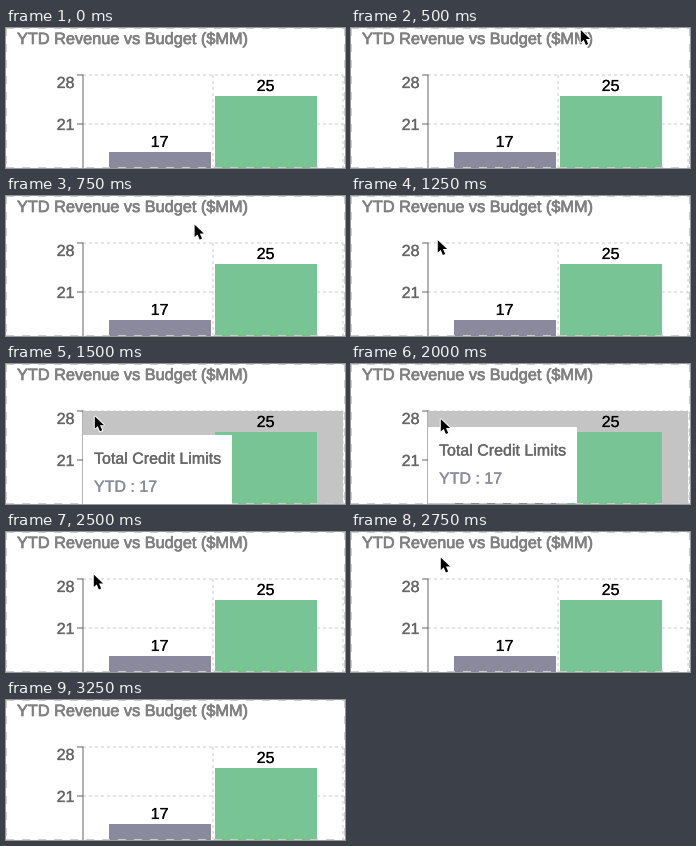
These frames come from a looping animation (339x140 px, 4.5 s). A matplotlib script:

```python
import math

import matplotlib.pyplot as plt
from matplotlib.animation import FuncAnimation
from matplotlib.patches import Polygon, Rectangle
from matplotlib.patheffects import withStroke
from matplotlib.transforms import Affine2D

W, H, DPI = 339, 140, 100
PX = 72 / DPI  # points per pixel
STEP, FRAMES = 250, 18

GREY, LIGHT, HOVER = "#666666", "#cccccc", "#c4c4c4"
TITLE, PURPLE, GREEN = "#808080", "#8a899d", "#78c495"

LEFT, RIGHT, TOP = 77, 337, 47
UNIT, Y_MAX, TICK = 7, 28, 7
BAR, GAP = 102, 4
MIDDLE = (LEFT + RIGHT) / 2

plt.rcParams["font.family"] = "Liberation Sans"
plt.rcParams["text.hinting"] = "none"

fig = plt.figure(figsize=(W / DPI, H / DPI), dpi=DPI, facecolor="white")
ax = fig.add_axes([0, 0, 1, 1])
ax.set_xlim(0, W)
ax.set_ylim(H, 0)
ax.axis("off")


def y_of(value):
    return TOP + UNIT * (Y_MAX - value)


def rect(x, y, width, height, color, z):
    return ax.add_patch(Rectangle((x, y), width, height, fc=color, lw=0, zorder=z))


def line(xs, ys, color, z, dash=None):
    ax.plot(xs, ys, color=color, lw=PX, ls=(0, dash) if dash else "-", zorder=z,
            dash_capstyle="butt", solid_capstyle="butt", snap=False)


def label(x, y, text, color, z, size=16, ha="left", weight=0.3):
    item = ax.text(x, y, text, color=color, fontsize=size * PX, ha=ha,
                   va="baseline", zorder=z)
    item.set_path_effects([withStroke(linewidth=weight * PX, foreground=color)])
    return item


# Grid and axis
for x in (MIDDLE, RIGHT):
    line([x, x], [TOP, H], LIGHT, 1, (3, 3))
line([LEFT, LEFT], [TOP - 0.5, H], GREY, 2)
for value in range(Y_MAX, Y_MAX - 3 * TICK, -TICK):
    y = y_of(value)
    line([LEFT, RIGHT], [y, y], LIGHT, 1, (3, 3))
    line([LEFT - 6, LEFT], [y, y], GREY, 2)
    label(LEFT - 8.5, max(y + 6, TOP + 13), str(value), GREY, 2, ha="right")
hover = rect(LEFT, TOP, RIGHT - LEFT, H - TOP, HOVER, 3)

# Bars
for x, value, color in ((MIDDLE - GAP - BAR, 17, PURPLE), (MIDDLE + 2, 25, GREEN)):
    x = x + GAP / 2 if x < MIDDLE else x
    rect(x, y_of(value), BAR, H - y_of(value), color, 4)
    label(x + BAR / 2 - 0.4, y_of(value) - 5, str(value), "black", 5,
          ha="center", weight=0.15)

label(11, 16, "YTD Revenue vs Budget ($MM)", TITLE, 5, size=16.3, weight=0.7)

# Dashed frame around the stage
for y in (0.5, H - 0.5):
    line([0, W], [y, y], LIGHT, 6, (8, 8))
for x in (0.5, W - 0.5):
    line([x, x], [0, H], LIGHT, 6, (8, 8))

# Tooltip
box = rect(LEFT, 0, 149, 76, "white", 7)
heading = label(LEFT + 11, 0, "Total Credit Limits", GREY, 8)
entry = label(LEFT + 11, 0, "YTD : 17", PURPLE, 8)
tooltip = (hover, box, heading, entry)

# Arrow pointer
ARROW = [(1.3, 1.6), (1.3, 14), (4.2, 11.4), (6.4, 16.5), (8.7, 15.5),
         (6.5, 10.5), (10.6, 10.5)]
outline = ax.add_patch(Polygon(ARROW, fc="white", ec="white", lw=2 * PX, zorder=9))
arrow = ax.add_patch(Polygon(ARROW, fc="black", lw=0, zorder=10))
pointer = (outline, arrow)

# Bezier control points of the pointer's way in, over the bar and out
WAY_IN = [(228.5, 0.5), (191, 56), (142, 2), (85.5, 42.5)]
OVER_BAR = [(85.5, 42.5), (88, 53.5), (88.5, 53.5)]
WAY_OUT = [(86.5, 41), (41.5, 17), (184.5, 21)]
ENTER, ARRIVE, SHOW, REST, LEAVE, GONE = 2, 5, 6, 7, 10, 13


def bezier(points, u):
    n = len(points) - 1
    weights = [math.comb(n, k) * u**k * (1 - u)**(n - k) for k in range(n + 1)]
    return [sum(w * p[axis] for w, p in zip(weights, points)) for axis in (0, 1)]


def pointer_at(step):
    if step < ARRIVE:
        return bezier(WAY_IN, (step - ENTER) / (ARRIVE - ENTER))
    if step < LEAVE:
        return bezier(OVER_BAR, min((step - ARRIVE) / (REST - ARRIVE), 1))
    return bezier(WAY_OUT, (step - LEAVE) / (GONE - 1 - LEAVE))


def draw(step):
    for part in pointer:
        part.set_visible(ENTER <= step < GONE)
        part.set_transform(Affine2D().translate(*pointer_at(step)) + ax.transData)

    # The tooltip eases up to its resting place
    y = 63 + 8.3 * math.exp(-2.1 * (step - SHOW))
    for part in tooltip:
        part.set_visible(SHOW <= step < LEAVE)
    box.set_y(y)
    heading.set_y(y + 28.4)
    entry.set_y(y + 56.4)
    return (*pointer, *tooltip)


anim = FuncAnimation(fig, draw, frames=FRAMES, interval=STEP, repeat=True,
                     repeat_delay=0, blit=False)
plt.show()
```
